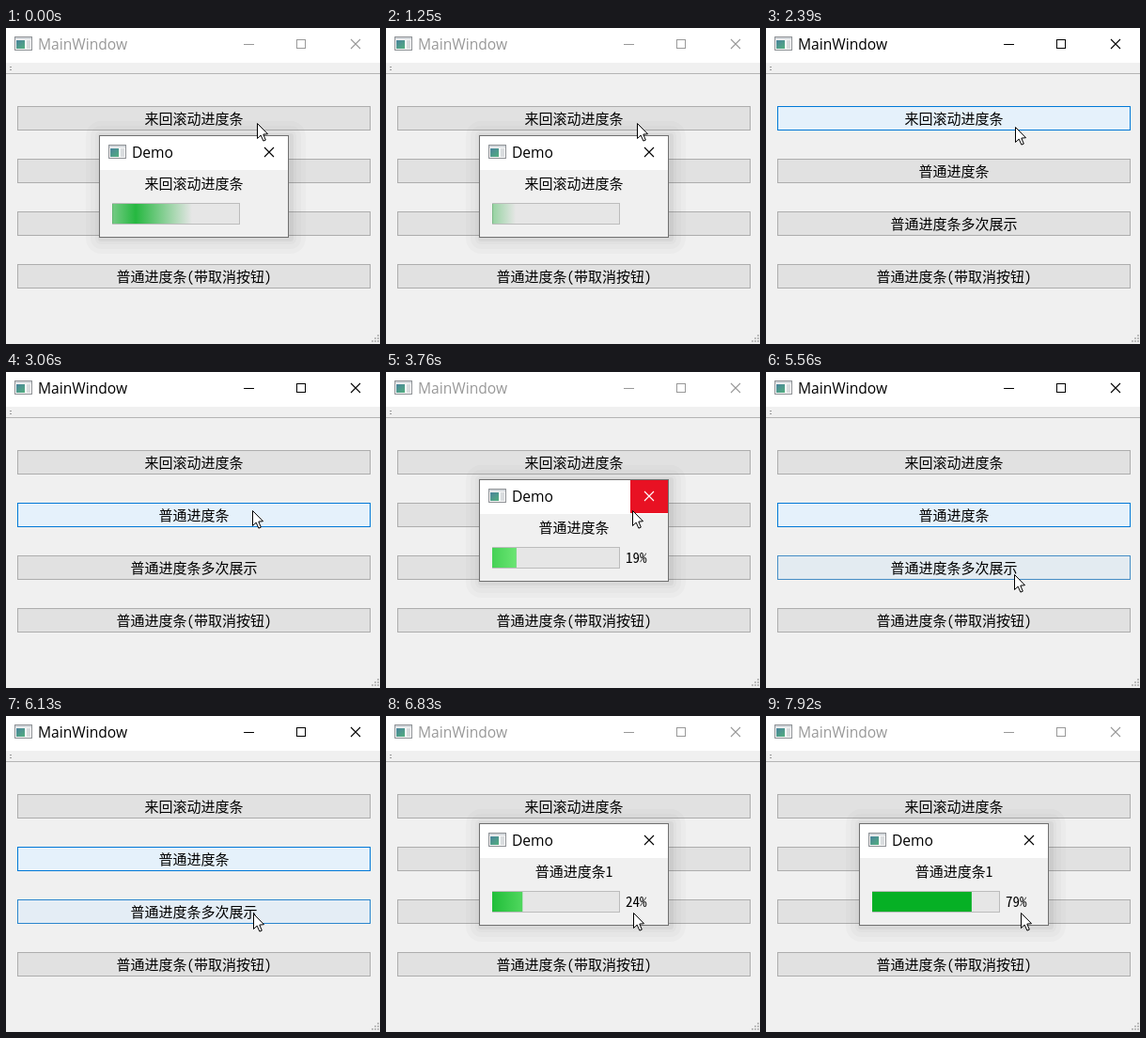
Write an HTML page with a canvas that moves like this. It is 398x336 px and loops after 8000 ms.

```html
<!DOCTYPE html>
<html lang="zh-CN">
<head>
<meta charset="utf-8">
<title>Progress dialogs</title>
<style>
html, body { margin: 0; width: 100%; height: 100%; overflow: hidden; background: #f0f0f0; }
canvas { display: block; width: 100vw; height: 100vh; }
</style>
</head>
<body>
<canvas id="stage" width="398" height="336"></canvas>
<script>
const c = document.getElementById('stage').getContext('2d');
const LOOP = 8000, STEP = 139; // the screen updates about seven times a second
const UI = '15.6px "Open Sans", "Noto Sans", sans-serif';
const CJK = '15px "Noto Sans Mono CJK SC", "Noto Sans CJK SC", "Noto Sans CJK JP", "Noto Sans CJK", sans-serif';
const LABELS = ['来回滚动进度条', '普通进度条', '普通进度条多次展示', '普通进度条(带取消按钮)'];

// from, to: in steps; zero: time of 0 % in ms
const DIALOGS = [
  { from: 0, to: 12, label: '来回滚动进度条', busy: true },
  { from: 25, to: 39, label: '普通进度条', zero: 3365 },
  { from: 46, to: 99, label: '普通进度条1', zero: 6323 }
];
// button, start, end in steps
const HOVERS = [[0, 11, 20.5], [1, 19.5, 99], [2, 38.5, 43], [2, 42.1, 99]];
// step, x, y
const PATH = [[0, 267, 101], [16, 267, 101], [17, 265, 105], [21, 262, 146], [22, 262, 147],
  [35, 262, 147], [36, 262, 149], [37, 262, 181], [40, 264, 215], [42, 264, 224],
  [44, 263, 210], [52, 263, 209], [54, 271, 209], [99, 271, 209]];

const clamp = v => Math.max(0, Math.min(1, v));
const mix = (a, b, k) => `rgb(${a.map((v, i) => Math.round(v + (b[i] - v) * k))})`;

function rect(x, y, w, h, fill) {
  c.fillStyle = fill;
  c.fillRect(x, y, w, h);
}

function box(x, y, w, h, fill, edge) {
  rect(x, y, w, h, edge);
  rect(x + 1, y + 1, w - 2, h - 2, fill);
}

function text(s, x, y, font, fill, align = 'left') {
  c.font = font;
  c.fillStyle = fill;
  c.textAlign = align;
  c.fillText(s, x, y);
}

function cross(x, y, color) {
  c.strokeStyle = color;
  c.lineWidth = 1.1;
  c.beginPath();
  c.moveTo(x - 5, y - 5); c.lineTo(x + 5, y + 5);
  c.moveTo(x + 5, y - 5); c.lineTo(x - 5, y + 5);
  c.stroke();
}

function fade(x, w, stops) {
  const g = c.createLinearGradient(x, 0, x + w, 0);
  stops.forEach((s, i) => g.addColorStop(i / (stops.length - 1), s));
  return g;
}

function icon(x, y) {
  box(x, y, 19, 15, '#f8f8f8', '#8f9296');
  rect(x + 1, y + 1, 17, 2, '#d5d9dd');
  const g = c.createLinearGradient(x + 2, y + 3, x + 10, y + 13);
  g.addColorStop(0, '#4a7f9e');
  g.addColorStop(1, '#52ad80');
  rect(x + 2, y + 4, 9, 9, g);
  rect(x + 13, y + 4, 4, 9, '#d9dcdf');
}

function mainWindow(active, n) {
  const ink = active ? '#000' : '#999';
  rect(0, 0, 398, 336, '#f0f0f0');
  rect(0, 0, 398, 37, '#fff');
  icon(9, 9);
  text('MainWindow', 34, 23, UI, ink);
  rect(253, 17, 11, 1, ink);
  box(309, 12, 10, 10, '#fff', ink);
  cross(372, 17, ink);
  rect(0, 48, 398, 1, '#b4b4b4');
  for (const y of [41, 44]) rect(4, y, 2, 1, '#999');

  LABELS.forEach((label, i) => {
    const y = 83 + 56 * i;
    let k = 0;
    if (active) for (const [b, s, e] of HOVERS)
      if (b === i) k = Math.max(k, clamp(Math.min(n - s, e - n) / 2.5));
    box(12, y, 376, 26, mix([225, 225, 225], [229, 241, 251], k), mix([173, 173, 173], [0, 120, 215], k));
    text(label, 200, y + 19, CJK, '#000', 'center');
  });

  for (let i = 0; i < 3; i++)
    for (let j = 2 - i; j < 3; j++) rect(389 + 3 * i, 326 + 3 * j, 2, 2, '#bdbdbd');
}

function progress(d, t) {
  box(113, 186, 136, 23, '#e6e6e6', '#bcbcbc');
  if (d.busy) {
    const x = 113 - 120 + (t + 340) % 1490 / 4;
    const left = Math.max(113, x), right = Math.min(248, x + 120);
    if (right > left) rect(left, 187, right - left, 21,
      fade(x, 120, ['rgba(6,176,37,0)', 'rgba(6,176,37,.86)', 'rgba(6,176,37,0)']));
    return;
  }
  const age = t - d.zero;
  const percent = Math.min(100, Math.floor(age / 20.15));
  const w = 1.34 * percent;
  rect(113, 187, w, 21, '#06b025');
  const x = 113 - 140 + age % 1600 / 4;
  rect(113, 187, w, 21, fade(x, 140, ['rgba(120,236,125,0)', 'rgba(120,236,125,.9)', 'rgba(120,236,125,0)']));
  text(percent + '%', 255, 203, CJK, '#000');
}

function dialog(d, t, n) {
  for (const [r, a] of [[16, .02], [11, .02], [6, .025], [3, .04]]) {
    c.fillStyle = `rgba(0,0,0,${a})`;
    c.beginPath();
    c.roundRect(101 - r, 115 - r, 202 + 2 * r, 109 + 2 * r, r);
    c.fill();
  }
  box(99, 114, 202, 109, '#f0f0f0', '#707070');
  rect(100, 115, 200, 36, '#fff');
  icon(109, 124);
  text('Demo', 134, 138, UI, '#000');
  const hot = n >= 25 ? clamp((38 - n) / 2) : 0;
  rect(260, 115, 40, 35, `rgba(232,17,35,${hot})`);
  cross(280, 132, hot === 1 ? '#fff' : '#000');
  text(d.label, 200, 171, CJK, '#000', 'center');
  progress(d, t);
}

function cursor(n) {
  const i = PATH.findIndex(p => p[0] > n);
  const [a, x0, y0] = PATH[i - 1], [b, x1, y1] = PATH[i];
  let k = (n - a) / (b - a);
  k = k * k * (3 - 2 * k);
  c.save();
  c.translate(Math.round(x0 + (x1 - x0) * k) + .5, Math.round(y0 + (y1 - y0) * k) + .5);
  c.fillStyle = '#fff';
  c.strokeStyle = '#000';
  c.lineWidth = 1;
  c.beginPath();
  for (const [x, y] of [[0, 0], [0, 16], [3.7, 12.6], [6.4, 18.6], [8.8, 17.6], [6.3, 11.6], [11, 11.2]]) c.lineTo(x, y);
  c.closePath();
  c.fill();
  c.stroke();
  c.restore();
}

function draw(now) {
  const n = Math.floor((now % LOOP + 28) / STEP), t = n * STEP;
  const open = DIALOGS.find(d => n >= d.from && n < d.to);
  mainWindow(!open, n);
  if (open) dialog(open, t, n);
  cursor(n);
}

const start = performance.now();
function tick() {
  draw(performance.now() - start);
  requestAnimationFrame(tick);
}
tick();
</script>
</body>
</html>
```
